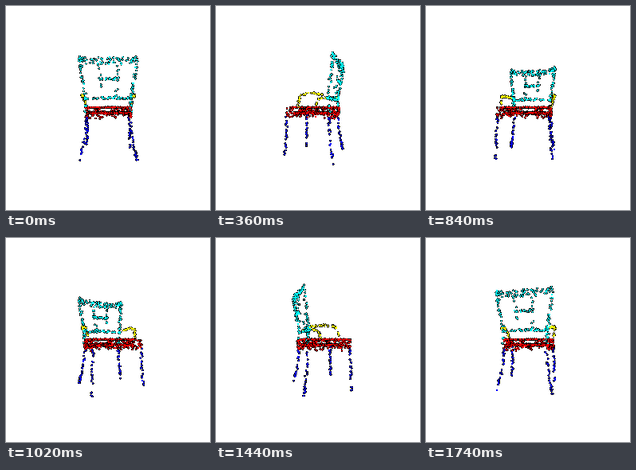
A matplotlib script that plays this animation: 256 by 256 pixels, repeating every 1800 ms.

```python
import numpy as np
import matplotlib.pyplot as plt
from matplotlib.animation import FuncAnimation

SIZE = 256
FRAMES = 30
INTERVAL = 60
EYE = 195.0  # camera distance, in pixels at unit scale

CYAN, YELLOW, RED, BLUE = (0, 1, 1), (1, 1, 0), (1, 0, 0), (0, 0, 1)

rng = np.random.default_rng(7)
points, colors = [], []


def add(color, xyz, jitter=0.6):
    """Store points given as side, back and height columns."""
    xyz = np.column_stack(xyz)
    points.append(xyz + rng.uniform(-jitter, jitter, xyz.shape))
    colors.append(np.tile(color, (len(xyz), 1)))


def path(color, knots, n, jitter=1.5):
    """Scatter points along a polyline."""
    knots = np.array(knots, float)
    steps = np.linalg.norm(np.diff(knots, axis=0), axis=1)
    dist = np.concatenate([[0], np.cumsum(steps)])
    t = rng.uniform(0, dist[-1], n)
    add(color, [np.interp(t, dist, k) for k in knots.T], jitter)


def seat_width(back):
    return np.interp(back, [-29, 22], [30, 25])


def seat_layer(n, height, inset, jitter):
    back = rng.uniform(-29 + inset, 22 - inset, n)
    side = rng.uniform(-1, 1, n) * (seat_width(back) - inset)
    add(RED, (side, back, np.full(n, height)), jitter)


def build_seat():
    seat_layer(200, 1.2, 0, 0.4)
    seat_layer(220, -5.5, 4, 0.9)
    for sign in (-1, 1):
        back = rng.uniform(-29, 22, 42)
        add(RED, (sign * seat_width(back), back, rng.uniform(-11, 1, 42)), 1)
    for back in (-29, 22):
        side = rng.uniform(-1, 1, 42) * seat_width(back)
        add(RED, (side, np.full(42, back), rng.uniform(-11, 1, 42)), 1)


def build_back():
    u = rng.uniform(-1, 1, 80)
    bow = 1 - u ** 2
    drop = 7 * rng.random(80) ** 1.3
    add(CYAN, (31.5 * u, 25.5 + 4 * bow, 56.5 - 2.5 * bow - drop), 0.9)
    u = rng.uniform(-1, 1, 22)
    add(CYAN, (11 * u, 27 - u ** 2, np.full(22, 32)), 1.3)
    u = rng.uniform(-1, 1, 46)
    add(CYAN, (26 * u, 15 + 4 * u ** 2, np.full(46, 12)), 1.4)
    for s in (-1, 1):
        path(CYAN, [(25 * s, 21, -8), (26 * s, 20, 12),
                    (29 * s, 23, 36), (31.5 * s, 25.5, 56)], 40)
        path(CYAN, [(9 * s, 18, 12), (9.5 * s, 26, 32), (10 * s, 28, 50)], 8)


def build_arms():
    for s in (-1, 1):
        path(YELLOW, [(28 * s, 19, 14), (32 * s, 5, 16), (32.5 * s, -7, 15),
                      (32 * s, -11, 12), (29 * s, -14, 2)], 36, 1.1)


def build_legs():
    for s in (-1, 1):
        path(BLUE, [(29.5 * s, -28, -9), (31 * s, -29, -57)], 25, 1.2)
        path(BLUE, [(24 * s, 20, -9), (26 * s, 21, -30),
                    (31.5 * s, 26, -57)], 28, 1.2)


build_seat()
build_back()
build_arms()
build_legs()
points = np.vstack(points)
colors = np.vstack(colors)

# Each dot is a bright core with a black rim, sampled at pixel centres.
CORE, RIM, LIFT = 0.85, 1.45, 8
DX, DY = (g.ravel() for g in np.meshgrid([-1, 0, 1, 2], [-1, 0, 1, 2]))


def render(frame):
    a = 2 * np.pi * frame / FRAMES
    side, back, height = points.T
    x = side * np.cos(a) + back * np.sin(a)
    near = back * np.cos(a) - side * np.sin(a)
    scale = EYE / (EYE - near)
    cx = (128 + x * scale)[:, None]
    cy = (128 - height * scale)[:, None]
    px = np.floor(cx).astype(int) + DX
    py = np.floor(cy).astype(int) + DY

    dist = np.hypot(px - cx, py - cy)
    core = dist < CORE
    depth = near[:, None] + LIFT * core
    rgb = colors[:, None, :] * core[..., None]

    inside = dist < RIM
    order = np.argsort(depth[inside])
    img = np.ones((SIZE, SIZE, 3))
    img[py[inside][order], px[inside][order]] = rgb[inside][order]
    return img


fig = plt.figure(figsize=(2.56, 2.56), dpi=100, facecolor="white")
ax = fig.add_axes([0, 0, 1, 1])
ax.axis("off")
view = ax.imshow(render(0), interpolation="nearest", aspect="auto")


def update(frame):
    view.set_data(render(frame))
    return (view,)


anim = FuncAnimation(fig, update, frames=FRAMES, interval=INTERVAL,
                     repeat=True, repeat_delay=0)
plt.show()
```
